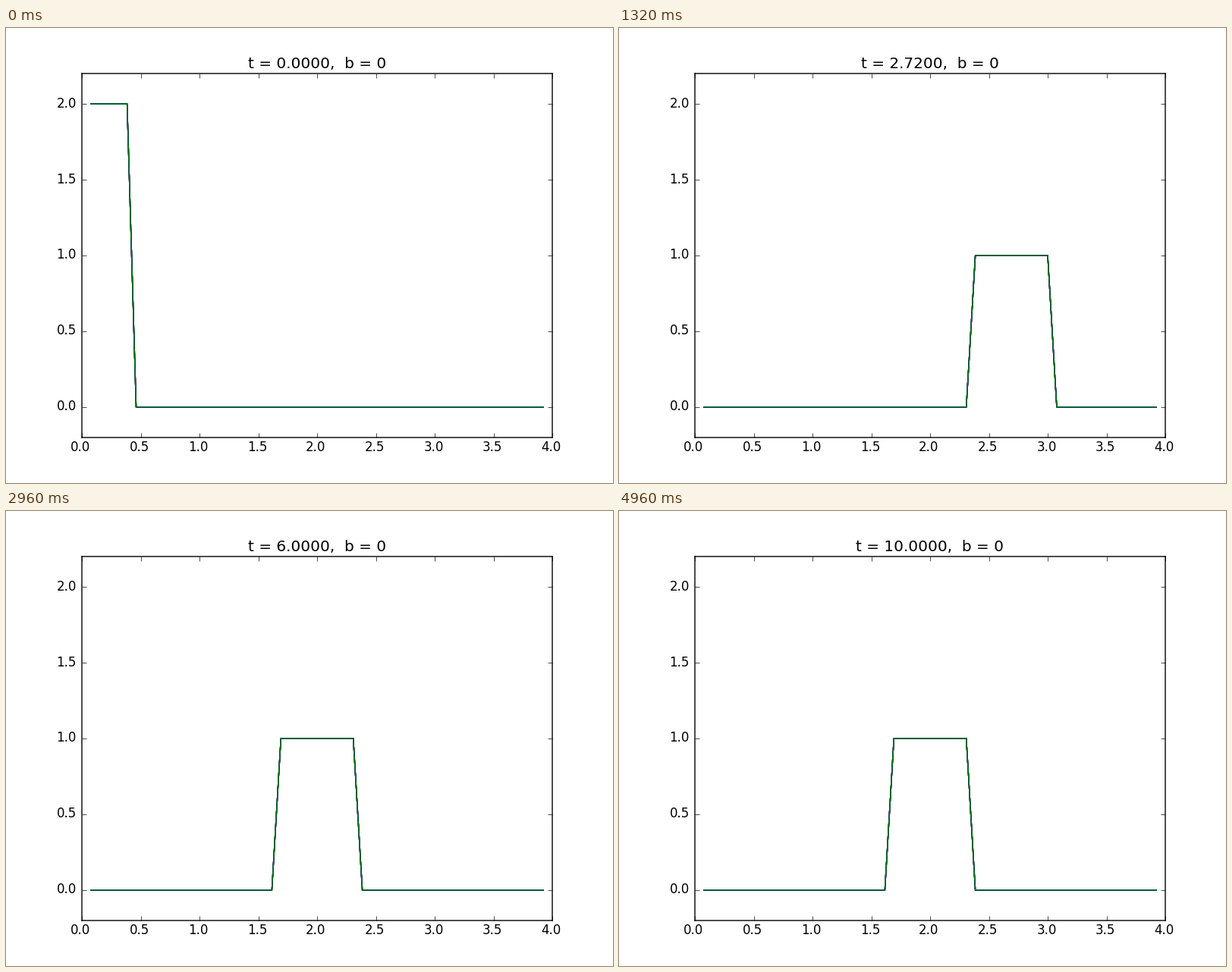
Animation of 800x600 px, one loop 5 s. Source, as a matplotlib script:

```python
import numpy as np
import matplotlib.pyplot as plt
from matplotlib.animation import FuncAnimation
from matplotlib.transforms import ScaledTranslation

plt.style.use("classic")
plt.rcParams["font.family"] = "DejaVu Sans"

DPI = 100
FRAMES = 125
INTERVAL = 40          # ms
DT = 0.08              # simulated time per step
CELLS = 50             # cells between the two reflecting walls
DX = 4 / 52
HALF_WIDTH = 4         # cells from the left wall to the pulse edge
CURVES = 9             # coinciding curves, coloured by the default cycle

cells = np.arange(CELLS + 1)
x = DX * (cells + 1)


def initial(j):
    """Pulse of height 2 at the left wall, mirrored and periodic."""
    period = 2 * CELLS
    offset = (j + CELLS) % period - CELLS
    return np.where(np.abs(offset) <= HALF_WIDTH, 2.0, 0.0)


def wave(step):
    """At unit Courant number each half pulse moves one cell per step."""
    return 0.5 * (initial(cells - step) + initial(cells + step))


def nudge(labels, dx, dy):
    """Shift tick labels by pixels, dy upwards."""
    shift = ScaledTranslation(dx / DPI, dy / DPI, fig.dpi_scale_trans)
    for label in labels:
        label.set_transform(label.get_transform() + shift)


fig = plt.figure(figsize=(8, 6), dpi=DPI, facecolor="white")
ax = fig.add_axes([0.125, 0.1, 0.775, 0.8])
ax.set_xlim(0, 4)
ax.set_ylim(-0.2, 2.2)
ax.set_xticks(np.arange(0, 4.1, 0.5))
ax.set_yticks(np.arange(0, 2.1, 0.5))

# Older layout: frame centred on pixel edges, labels aligned by their ink.
for spine in ax.spines.values():
    spine.set_snap(False)
nudge(ax.get_xticklabels(), -1.6, 1.5)
nudge(ax.get_yticklabels(), -1.6, 0.5)

lines = [ax.plot(x, wave(0), linewidth=1)[0] for _ in range(CURVES)]
title = ax.set_title("")


def update(frame):
    # The first computed step is not displayed.
    step = frame + 1 if frame else 0
    for line in lines:
        line.set_ydata(wave(step))
    title.set_text(f"t = {step * DT:.4f},  b = 0")
    return [*lines, title]


anim = FuncAnimation(fig, update, frames=FRAMES, interval=INTERVAL,
                     repeat=True, repeat_delay=0, blit=False)
plt.show()
```
